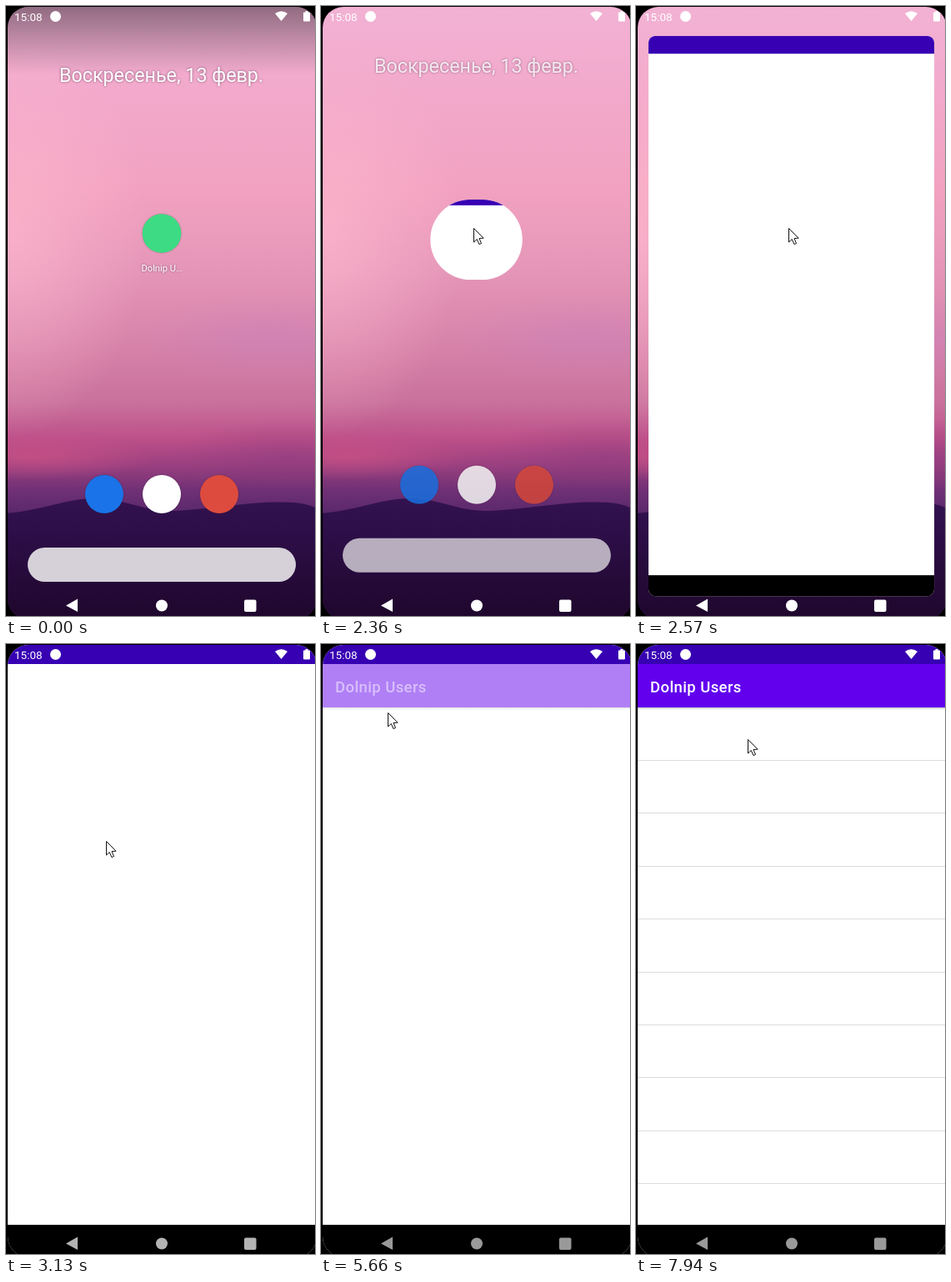
Write an HTML page with a canvas that moves like this. It is 371 px wide and 731 px high and loops after 8 s.

```html
<!DOCTYPE html>
<html lang="ru">
<head>
<meta charset="utf-8">
<title>App launch</title>
<style>
  html, body { margin: 0; width: 100%; height: 100%; overflow: hidden; background: #000; }
  canvas { display: block; }
</style>
</head>
<body>
<canvas id="stage" width="371" height="731"></canvas>
<script>
const W = 371, H = 731, LOOP = 8000;
const ctx = document.getElementById('stage').getContext('2d');

const clamp = v => Math.max(0, Math.min(1, v));
const lerp = (a, b, k) => a + (b - a) * k;

function gradient(x0, y0, x1, y1, stops) {
  const g = ctx.createLinearGradient(x0, y0, x1, y1);
  for (const [at, color] of stops) g.addColorStop(at, color);
  return g;
}

function rect(x, y, w, h, fill) {
  ctx.fillStyle = fill;
  ctx.fillRect(x, y, w, h);
}

function rounded(x, y, w, h, r, fill) {
  ctx.beginPath();
  ctx.roundRect(x, y, w, h, r);
  ctx.fillStyle = fill;
  ctx.fill();
}

function circle(x, y, r, fill) {
  ctx.beginPath();
  ctx.arc(x, y, r, 0, Math.PI * 2);
  ctx.fillStyle = fill;
  ctx.fill();
}

function polygon(points, fill) {
  ctx.beginPath();
  points.forEach(([x, y]) => ctx.lineTo(x, y));
  ctx.closePath();
  ctx.fillStyle = fill;
  ctx.fill();
}

function text(str, x, y, font, align = 'left', spacing = 0) {
  ctx.font = font + ' Roboto, sans-serif';
  ctx.textAlign = align;
  ctx.letterSpacing = spacing + 'px';
  ctx.fillStyle = '#fff';
  ctx.fillText(str, x, y);
}

function shadow(blur, color) {
  ctx.shadowBlur = blur;
  ctx.shadowColor = color;
}

function glow(x, y, rx, ry, rgb, alpha) {
  ctx.save();
  ctx.translate(x, y);
  ctx.scale(rx, ry);
  const g = ctx.createRadialGradient(0, 0, 0, 0, 0, 1);
  g.addColorStop(0, `rgba(${rgb},${alpha})`);
  g.addColorStop(1, `rgba(${rgb},0)`);
  ctx.fillStyle = g;
  ctx.fillRect(-1, -1, 2, 2);
  ctx.restore();
}

function wallpaper() {
  rect(0, 0, W, H, gradient(0, 0, 0, 610, [
    [0, '#f2b2d4'], [0.16, '#f2a9cc'], [0.36, '#f2a2c0'], [0.52, '#e596b8'],
    [0.66, '#d784aa'], [0.78, '#c9719c'], [0.85, '#bd5089'], [0.9, '#9c4080'],
    [0.95, '#713175'], [1, '#58276b']
  ]));
  glow(0, 270, 170, 250, '255,184,206', 0.7);
  glow(320, 400, 170, 55, '202,128,186', 0.5);
  glow(30, 540, 150, 28, '214,86,134', 0.6);
  glow(340, 540, 140, 45, '130,55,125', 0.35);

  ctx.beginPath();
  ctx.moveTo(0, 608);
  ctx.bezierCurveTo(45, 604, 75, 589, 112, 590);
  ctx.bezierCurveTo(150, 593, 165, 606, 205, 605);
  ctx.bezierCurveTo(255, 602, 300, 592, 345, 595);
  ctx.quadraticCurveTo(360, 596, W, 601);
  ctx.lineTo(W, H);
  ctx.lineTo(0, H);
  ctx.fillStyle = gradient(0, 590, 0, H, [[0, '#331250'], [0.4, '#2b0d44'], [1, '#1f072d']]);
  ctx.fill();
}

function workspace(fade) {
  ctx.save();
  ctx.globalAlpha = 1 - fade;
  ctx.translate(0, -Math.min(34, 62 * fade));
  shadow(3, 'rgba(70,30,60,.65)');
  text('Воскресенье, 13 февр.', 186.5, 91, '23.3px', 'center');
  text('Dolnip U…', 187, 318, '11.2px', 'center');
  shadow(2, 'rgba(0,0,0,.3)');
  circle(187, 272.5, 23.3, '#3ddc84');
  circle(118, 585, 23, '#1a73e8');
  circle(187, 585, 23, '#fff');
  circle(256, 585, 23, '#dd4b3e');
  shadow(0, 'transparent');
  rounded(26, 649, 322, 41, 20.5, '#d6d1d9');
  ctx.restore();
}

// Window content is scaled to the width and cropped at the bottom.
function appWindow(p) {
  const w = lerp(46, 369, p);
  const h = lerp(47, 730, p - p * (1 - p) ** 2);
  const x = 186.5 - w / 2;
  const y = lerp(249, 1, p - 0.82 * p * (1 - p));
  const scale = w / 369;
  ctx.save();
  ctx.globalAlpha = clamp(p * 6);
  ctx.beginPath();
  ctx.roundRect(x, y, p === 1 ? W : w, h, Math.min(w / 2, 107 * (1 - p)));
  ctx.clip();
  ctx.translate(x, y);
  ctx.scale(scale, scale);
  rect(0, 0, 371, 740, '#fff');
  rect(0, 0, 371, 23, '#3700b3');
  rect(0, 695, 371, 45, '#000');
  ctx.restore();
}

function toolbar(alpha) {
  ctx.save();
  ctx.globalAlpha = alpha;
  rect(2, 76, W, 3, gradient(0, 76, 0, 79, [[0, 'rgba(0,0,0,.22)'], [1, 'rgba(0,0,0,0)']]));
  rect(2, 24, W, 52, '#6200ee');
  text('Dolnip Users', 17, 57.5, '500 18.5px', 'left', 0.4);
  ctx.restore();
}

function statusBar() {
  text('15:08', 10, 17.5, '13.5px');
  circle(59.5, 12.5, 6.5, '#fff');
  ctx.beginPath();
  ctx.moveTo(330.5, 18);
  ctx.lineTo(323, 9);
  ctx.quadraticCurveTo(330.5, 3.5, 338, 9);
  ctx.closePath();
  ctx.fill();
  rounded(357, 7.5, 8, 11, 1, '#fff');
  rect(359.5, 6, 3, 2, '#fff');
}

function navButtons(gray) {
  const v = Math.round(lerp(255, 153, gray));
  const color = `rgb(${v},${v},${v})`;
  polygon([[72, 718.5], [86, 710.5], [86, 726]], color);
  circle(187, 718.5, 7, color);
  rounded(286, 711.5, 14.5, 14.5, 2, color);
}

// start, end, number of steps, points passed
const moves = [
  [190, 330, 3, [[243, 574], [222, 458], [197, 348]]],
  [990, 1270, 5, [[196, 341], [191, 296], [185, 254]]],
  [1490, 1560, 2, [[184, 260], [183, 266]]],
  [2780, 3270, 8, [[176, 263], [98, 225]]],
  [3690, 4380, 11, [[97, 216], [79, 83]]],
  [4650, 4650, 1, [[80, 82]]],
  [6200, 6820, 9, [[104, 119], [127, 155], [134, 114]]]
];

function stepIndex(t, start, end, steps) {
  if (t >= end) return steps - 1;
  return Math.floor((t - start) / (end - start) * (steps - 1) + 0.01);
}

function cursorAt(t) {
  const move = moves.filter(m => t >= m[0]).pop();
  if (!move) return null;
  const [start, end, steps, points] = move;
  if (steps === 1) return points[0];
  const k = stepIndex(t, start, end, steps) / (steps - 1) * (points.length - 1);
  const i = Math.min(Math.floor(k), points.length - 2);
  return [0, 1].map(axis => Math.round(lerp(points[i][axis], points[i + 1][axis], k - i)));
}

function cursor([x, y]) {
  ctx.save();
  ctx.translate(x + 0.5, y + 0.5);
  polygon([[0, 0], [0, 16.5], [3.8, 13], [6.4, 19], [9, 18], [6.5, 12], [11.6, 11.7]], '#fff');
  ctx.strokeStyle = '#111';
  ctx.lineWidth = 1;
  ctx.stroke();
  ctx.restore();
}

const growth = [0, 0, 0, 0.02, 0.06, 0.2, 0.47, 0.72, 0.85, 0.92, 0.965, 0.985, 1];

function draw(t) {
  const step = Math.max(-1, Math.floor((t - 1960) / 67.1));
  const p = step < 0 ? 0 : growth[Math.min(step, 12)];

  rect(0, 0, W, H, '#000');
  ctx.save();
  ctx.beginPath();
  ctx.roundRect(2, 1, 371, 734, 25);
  ctx.clip();

  if (p < 1) {
    wallpaper();
    ctx.globalAlpha = clamp(1 - (step + 1) / 6);
    rect(0, 0, W, 82, gradient(0, 0, 0, 82, [[0, 'rgba(45,35,45,.5)'], [1, 'rgba(45,35,45,0)']]));
    ctx.globalAlpha = 1;
    workspace(clamp((step - 4) / 5.5));
  }
  if (p > 0) appWindow(p);
  if (t >= 5660) toolbar([0.5, 0.85, 1][stepIndex(t, 5660, 5800, 3)]);
  if (t >= 7940) {
    for (let i = 0; i < 9; i++) rect(2, Math.round(139 + i * 63.4), W, 1, '#dcdcdc');
  }
  statusBar();
  navButtons(t < 2780 ? 0 : (stepIndex(t, 2780, 3270, 8) + 1) / 8);
  ctx.restore();

  const pos = cursorAt(t);
  if (pos) cursor(pos);
}

function tick() {
  draw(performance.now() % LOOP);
  requestAnimationFrame(tick);
}
tick();
</script>
</body>
</html>
```
